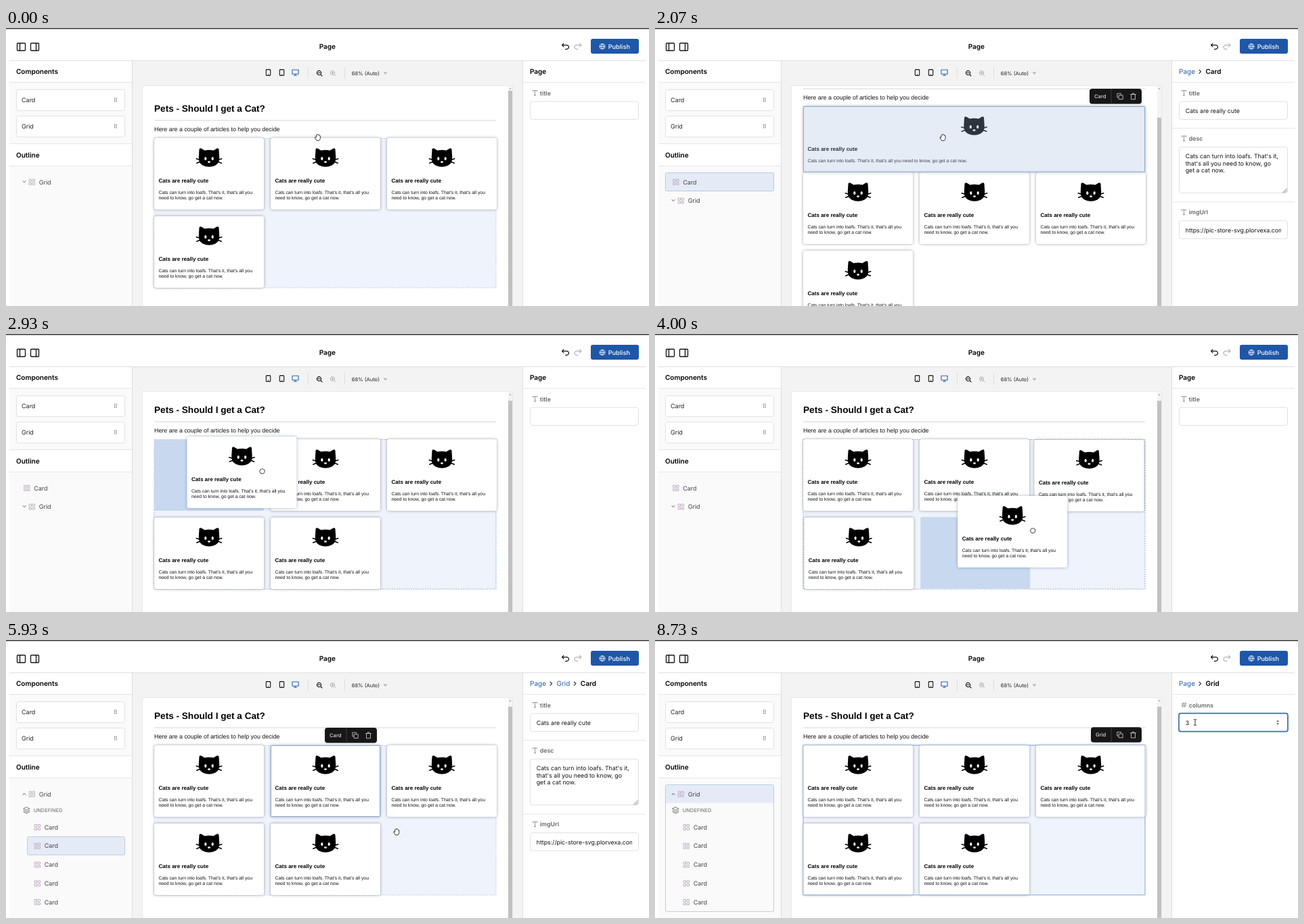
These frames come from a looping animation (950 by 412 pixels, 8.94 s). An HTML page with a canvas:

```html
<!DOCTYPE html>
<html lang="en">
<head>
<meta charset="utf-8">
<title>Page editor</title>
<style>
html, body { margin: 0; width: 100%; height: 100%; overflow: hidden; background: #fff; }
canvas { display: block; width: 950px; height: 412px; }
</style>
</head>
<body>
<canvas id="stage"></canvas>
<script>
const W = 950, H = 412, LOOP = 8940;
const canvas = document.getElementById('stage');
const ctx = canvas.getContext('2d');
const ratio = window.devicePixelRatio || 1;
canvas.width = W * ratio;
canvas.height = H * ratio;

const UI = 'Inter, sans-serif';
const ARIAL = '"Liberation Sans", Arial, sans-serif';
const LINE = '#dedede', BLUE = '#1f57a8', SOFT_BLUE = '#c8d8ee', ZONE = '#eff3fb';
const TITLE = 'Cats are really cute';
const DESC = ["Cats can turn into loafs. That's it, that's all you", 'need to know, go get a cat now.'];
const IMAGE = 'https:\/\/pic-store-svg.plorvexa.com';

// Moments of the story, in ms
const LEAVE = 380, GRAB_NEW = 750, ENTER_PAGE = 1150, DROP_NEW = 1700,
  GRAB_CARD = 2270, ENTER_GRID = 2450, DROP_CARD = 5300, PICK_GRID = 6600, FOCUS = 7070;

// Cursor path and page scroll as [time, ...values]
const CURSOR = [[0, 461, 162], [150, 440, 158], [650, 62, 108], [750, 62, 108], [930, 120, 118],
  [1250, 330, 165], [1600, 420, 168], [2070, 426, 162], [2270, 330, 167], [2600, 345, 190],
  [2930, 378, 203], [3200, 500, 205], [3500, 640, 215], [3750, 610, 270], [4000, 558, 291],
  [4300, 600, 285], [4600, 595, 225], [5000, 476, 228], [5250, 472, 214], [5600, 500, 240],
  [6200, 640, 320], [6650, 640, 325], [7030, 798, 122]];
const SCROLL = [[0, 0], [1300, 0], [1750, 47], [2300, 47], [2650, 7]];
// Slot of the dragged card inside the grid
const SLOTS = [[ENTER_GRID, 0], [3080, 1], [3400, 2], [3800, 4], [4450, 2], [5100, 1]];
const GRAB = { x: 111, y: 51 };
const ROOT = { x: 219, y: 163, w: 505, h: 97.5 };

const clamp = v => Math.max(0, Math.min(1, v));
const ease = p => 1 - (1 - clamp(p)) ** 3;
const lerp = (a, b, p) => a + (b - a) * p;
const mix = (a, b, p) => ({ x: lerp(a.x, b.x, p), y: lerp(a.y, b.y, p), w: lerp(a.w, b.w, p), h: lerp(a.h, b.h, p) });
const within = (t, from, to) => t >= from && t < to;

function along(track, t) {
  let i = track.length - 1;
  while (track[i][0] > t) i--;
  const a = track[i], b = track[i + 1];
  if (!b) return a.slice(1);
  const p = (t - a[0]) / (b[0] - a[0]);
  return a.slice(1).map((v, k) => lerp(v, b[k + 1], p));
}

function text(s, x, y, size, color = '#000', weight = 400, font = UI) {
  ctx.font = `${weight} ${size}px ${font}`;
  ctx.fillStyle = color;
  ctx.fillText(s, x, y + size * 0.36);
  return ctx.measureText(s).width;
}

function rect(x, y, w, h, fill) {
  ctx.fillStyle = fill;
  ctx.fillRect(x, y, w, h);
}

function box(x, y, w, h, r, fill, stroke, width = 1) {
  ctx.beginPath();
  ctx.roundRect(x, y, w, h, r);
  if (fill) { ctx.fillStyle = fill; ctx.fill(); }
  if (stroke) { ctx.strokeStyle = stroke; ctx.lineWidth = width; ctx.stroke(); }
}

function icon(path, x, y, stroke, width = 1, fill) {
  ctx.save();
  ctx.translate(x, y);
  ctx.lineCap = ctx.lineJoin = 'round';
  const shape = new Path2D(path);
  if (fill) { ctx.fillStyle = fill; ctx.fill(shape); }
  if (stroke) { ctx.strokeStyle = stroke; ctx.lineWidth = width; ctx.stroke(shape); }
  ctx.restore();
}

const ICON = {
  undo: 'M-2.5-4.5L-5-2L-2.5.5M-5-2H2A2.9 2.9 0 0 1 2 4H0',
  redo: 'M2.5-4.5L5-2L2.5.5M5-2H-2A2.9 2.9 0 0 0-2 4H0',
  globe: 'M-4 0A4 4 0 1 1 4 0A4 4 0 1 1-4 0H4M0-4Q-3.4 0 0 4Q3.4 0 0-4',
  phone: 'M-2.3-4.4H2.3Q3.2-4.4 3.2-3.5V3.5Q3.2 4.4 2.3 4.4H-2.3Q-3.2 4.4-3.2 3.5V-3.5Q-3.2-4.4-2.3-4.4ZM0 2.5V2.6',
  monitor: 'M-4.6-4H4.6V2.2H-4.6ZM0 2.2V4.3M-2 4.3H2',
  zoomOut: 'M2.6-.5A3.1 3.1 0 1 1-3.6-.5A3.1 3.1 0 1 1 2.6-.5M1.8 1.8L4 4M-2-.5H1',
  zoomIn: 'M2.6-.5A3.1 3.1 0 1 1-3.6-.5A3.1 3.1 0 1 1 2.6-.5M1.8 1.8L4 4M-2-.5H1M-.5-2V1',
  grid: 'M-4-4H-1V-1H-4ZM1-4H4V-1H1ZM-4 1H-1V4H-4ZM1 1H4V4H1Z',
  layers: 'M0-4.5L4.5-2.2L0 .1L-4.5-2.2ZM-4.5.2L0 2.5L4.5.2M-4.5 2.4L0 4.7L4.5 2.4',
  down: 'M-2-1L0 1L2-1',
  up: 'M-2 1L0-1L2 1',
  right: 'M-1.3-2.6L1.3 0L-1.3 2.6',
  copy: 'M-1.5-1.5H4.2V4.2H-1.5ZM-2.6 1.5H-4.2V-4.2H1.5V-2.6',
  trash: 'M-4-2.8H4M-3-2.8V4.4H3V-2.8M-1.4-2.8V-4.4H1.4V-2.8',
  letter: 'M-3.2-2.4V-3.6H3.2V-2.4M0-3.6V3.6M-1.2 3.6H1.2',
  hash: 'M-3.4-1.4H3.6M-3.6 1.4H3.4M-.9-3.6L-1.9 3.6M1.9-3.6L.9 3.6',
  hand: 'M-2 4.5L-4.4.9Q-4.8-.6-3.6-.4L-2.6.5V-3Q-1.9-4.2-1.2-3.2V-4Q-.4-5 .4-4V-3.6Q1.2-4.5 1.9-3.5V-2.6Q3-3.2 3.5-2.2V1.5Q3.3 3 2.2 4.5Z',
  fist: 'M-2 3.6L-3.6 1Q-4-.8-2.6-1V-2.2Q-1.9-3.2-1-2.6Q-.2-3.6.6-2.7Q1.5-3.3 2.1-2.3Q3.3-2.5 3.5-1.2V1.2Q3.3 2.6 2.3 3.6Z',
  arrow: 'M0 0V10L2.4 7.8L4 11.2L5.5 10.5L4 7.2H7Z',
  beam: 'M-1.6-4.5Q0-4.5 0-3.4Q0-4.5 1.6-4.5M0-3.4V3.4M-1.6 4.5Q0 4.5 0 3.4Q0 4.5 1.6 4.5',
  cat: 'M-14.5-12Q-14-15-11-13.2L-6.5-10.4Q0-12 6.5-10.4L11-13.2Q14-15 14.5-12L15.2-1Q16 8 9.5 11.5Q0 16 -9.5 11.5Q-16 8-15.2-1Z',
  whiskers: 'M-14 3.2L-18.7 1.8M-14 6.5L-18.2 8.2M14 3.2L18.7 1.8M14 6.5L18.2 8.2'
};

function cat(x, y) {
  icon(ICON.cat, x, y, null, 1, '#000');
  icon(ICON.whiskers, x, y, '#000', 1.6);
  ctx.fillStyle = '#fff';
  for (const [dx, dy, rx, ry] of [[-5.2, 1.6, 1.6, 2.5], [5.2, 1.6, 1.6, 2.5], [0, 6.6, 2, 1.3]]) {
    ctx.beginPath();
    ctx.ellipse(x + dx, y + dy, rx, ry, 0, 0, 7);
    ctx.fill();
  }
}

function card({ x, y, w, h }, { hover, selected, lifted } = {}) {
  ctx.save();
  ctx.shadowColor = lifted ? 'rgba(70,100,150,.5)' : 'rgba(0,0,0,.36)';
  ctx.shadowBlur = 4 * ratio;
  box(x, y, w, h, 3, '#fff');
  ctx.restore();
  cat(x + w / 2, y + 29);
  text(TITLE, x + 6.5, y + 63.5, 8.04, '#000', 700, ARIAL);
  const lines = w > 300 ? [DESC.join(' ')] : DESC;
  lines.forEach((s, i) => text(s, x + 6.5, y + 80.2 + i * 8, 6.82, '#111', 400, ARIAL));
  if (hover) box(x, y, w, h, selected ? 0 : 3, 'rgba(160,188,223,.28)');
  if (selected) box(x + .5, y + .5, w - 1, h - 1, 0, null, '#8aabd9');
}

function actionBar(label, right, top) {
  const w = label === 'Card' ? 77 : 75;
  const x = right - 5 - w, y = top - 26, mid = y + 11.3;
  box(x, y, w, 22.5, 4, '#171717');
  text(label, x + 7, mid, 7.6, '#dcdcdc', 500);
  rect(right - 50.5, y, 1, 22.5, '#3c3c3c');
  icon(ICON.copy, right - 37, mid, '#c4c4c4', .9);
  icon(ICON.trash, right - 17.5, mid, '#c4c4c4', .9);
}

const slotBox = (i, top) => ({ x: 219 + i % 3 * 172, y: top + Math.floor(i / 3) * 116, w: 162, h: 106 });

// Box for slotOf(dragged slot), easing over from the slot before the latest move
function movingSlot(t, top, slotOf) {
  let i = SLOTS.length - 1;
  while (i >= 0 && SLOTS[i][0] > t) i--;
  const at = k => slotBox(slotOf(k < 0 ? Infinity : SLOTS[k][1]), top);
  if (i < 0) return at(-1);
  const from = i === 0 && slotOf(Infinity) === Infinity ? at(0) : at(i - 1);
  return mix(from, at(i), ease((t - SLOTS[i][0]) / 250));
}

function draggedBox(t, cursor, scroll) {
  const p = ease((t - ENTER_GRID) / 150);
  return { x: cursor.x - GRAB.x, y: cursor.y + scroll - GRAB.y, w: lerp(505, 162, p), h: lerp(97.5, 106, p) };
}

function looseCard(t, top) {
  const drop = t < GRAB_CARD ? DROP_NEW : DROP_CARD;
  const time = Math.min(t, drop);
  const [x, y] = along(CURSOR, time);
  const held = draggedBox(time, { x, y }, along(SCROLL, time)[0]);
  const home = drop === DROP_NEW ? ROOT : slotBox(SLOTS[SLOTS.length - 1][1], top);
  return mix(held, home, ease((t - drop) / 200));
}

function page(t, cursor, dragging) {
  const scroll = along(SCROLL, t)[0];
  rect(201, 85, 548, 327, '#e9e9e9');
  rect(202, 86, 540, 326, '#fff');
  rect(742, 86, 6, 326, '#f4f4f4');
  icon('M-1.6.8L0-1L1.6.8Z', 745, 90, null, 1, '#999');
  rect(742, 93 + scroll * .85, 6, 412, '#c1c1c1');

  ctx.save();
  ctx.beginPath();
  ctx.rect(202, 86, 540, 326);
  ctx.clip();
  ctx.translate(0, -scroll);
  text('Pets - Should I get a Cat?', 219, 119.5, 13.6, '#000', 700, ARIAL);
  rect(219, 136.5, 505, 1, '#d6d6d6');
  text('Here are a couple of articles to help you decide', 219, 150, 8.9, '#111', 400, ARIAL);

  const top = 163 + 98 * (ease((t - ENTER_PAGE) / 250) - ease((t - ENTER_GRID) / 150));
  const inGrid = within(t, ENTER_GRID, DROP_CARD);
  const picked = t >= PICK_GRID;
  if (t < LEAVE || t >= ENTER_GRID) {
    rect(219, top, 505, 222, ZONE);
    ctx.setLineDash(picked ? [] : [2, 1.5]);
    box(219, top + .5, 505, 221.5, 0, null, inGrid ? '#8fb0dc' : '#bcd0ea');
    ctx.setLineDash([]);
  }
  if (within(t, ENTER_PAGE, DROP_NEW) || within(t, GRAB_CARD, ENTER_GRID))
    rect(ROOT.x, ROOT.y, ROOT.w, ROOT.h, SOFT_BLUE);
  if (inGrid) {
    const gap = movingSlot(t, top, d => d);
    box(gap.x, gap.y, gap.w, gap.h, 2, SOFT_BLUE);
  }

  const hovered = b => !dragging && cursor.x > b.x && cursor.x < b.x + b.w &&
    cursor.y + scroll > b.y - 1 && cursor.y + scroll < b.y + b.h;
  for (let k = 0; k < 4; k++) {
    const b = movingSlot(t, top, d => k < d ? k : k + 1);
    card(b, { hover: hovered(b) });
  }
  if (t >= ENTER_PAGE) {
    const b = looseCard(t, top);
    const selected = within(t, DROP_NEW, GRAB_CARD) || within(t, DROP_CARD, PICK_GRID);
    card(b, { hover: hovered(b), selected, lifted: dragging });
    if (selected) actionBar('Card', b.x + b.w, b.y);
  }
  if (picked) {
    box(219, top - .3, 505, 222, 0, null, '#9dbbe2');
    actionBar('Grid', 724, top - .7);
  }
  ctx.restore();
}

function header() {
  rect(0, 0, W, 1.5, '#3a3a3c');
  rect(5, 48, 940, 1, LINE);
  for (const [x, bar] of [[22.5, -2], [42.5, 2]])
    icon(`M-5-5.5H5Q6-5.5 6-4.5V4.5Q6 5.5 5 5.5H-5Q-6 5.5-6 4.5V-4.5Q-6-5.5-5-5.5ZM${bar}-5.5V5.5`, x, 28, '#111', 1.3);
  text('Page', 462.7, 27.3, 10, '#000', 600);
  icon(ICON.undo, 826.5, 27.3, '#111', 1.2);
  icon(ICON.redo, 845, 27.3, '#b5b5b5', 1.2);
  box(864, 16, 71, 22, 3, BLUE);
  icon(ICON.globe, 881, 27.3, '#fff', .8);
  text('Publish', 889.7, 27.3, 9.2, '#fff', 500);
}

function viewBar() {
  rect(187, 49, 576, 363, '#f3f3f3');
  icon(ICON.phone, 387.5, 66, '#111', 1.1);
  icon(ICON.phone, 407.5, 66, '#111', 1.1);
  icon(ICON.monitor, 427.5, 66, '#2a66b8', 1.1);
  rect(446, 58, 1, 17, LINE);
  icon(ICON.zoomOut, 463, 67, '#111', 1.1);
  icon(ICON.zoomIn, 483, 67, '#b0b0b0', 1);
  rect(500, 58, 1, 17, LINE);
  text('68% (Auto)', 510.7, 66.8, 7.6, '#222');
  icon('M-3-1.5H3L0 2Z', 560.5, 67, null, 1, '#b5b5b5');
}

function outlineRow(label, iconX, y) {
  icon(ICON.grid, iconX, y, '#bda9c2', .9);
  text(label, iconX + 10.2, y, 9, '#444');
}

function sidebar(t) {
  rect(5, 49, 181, 363, '#fafafa');
  rect(5, 49, 181, 31, '#fff');
  rect(5, 172, 181, 32, '#fff');
  for (const y of [80, 171, 204]) rect(5, y, 181, 1, '#e6e6e6');
  rect(186, 49, 1, 363, LINE);
  text('Components', 15, 64.5, 10, '#000', 600);
  text('Outline', 15, 188, 10, '#000', 600);
  [['Card', 91], ['Grid', 130]].forEach(([label, y]) => {
    box(15.5, y + .5, 160, 31, 3, '#fff', '#e2e2e2');
    text(label, 23, y + 16, 9, '#222');
    for (let i = 0; i < 6; i++) rect(160 + i % 2 * 2.5, y + 12.5 + (i >> 1) * 2.3, 1.2, 1.2, '#555');
  });

  if (t >= DROP_CARD) {
    const picked = t >= PICK_GRID;
    if (picked) {
      box(15.5, 214.5, 160, 188, 2, null, '#bccde6');
      rect(16, 215, 159, 26.5, '#e5ebf6');
    } else box(31.5, 291.5, 144, 27, 2, '#e5ebf6', '#bccde6');
    icon(ICON.up, 27, 228.3, '#555');
    outlineRow('Grid', 38.5, 228.3);
    icon(ICON.layers, 30.5, 252.3, '#666', .9);
    text('UNDEFINED', 40.8, 252.7, 7.4, '#666');
    for (let i = 0; i < 5; i++) outlineRow('Card', 46.5, 277.5 + i * 27.75);
  } else if (t >= DROP_NEW) {
    if (t < GRAB_CARD) box(15.5, 214.5, 160, 27, 2, '#e5ebf6', '#b6c8e4');
    outlineRow('Card', 31, 228.3);
    icon(ICON.down, 27, 255.5, '#555');
    outlineRow('Grid', 38.5, 256);
  } else {
    icon(ICON.down, 27, 227.8, '#555');
    outlineRow('Grid', 38.5, 228.3);
  }
}

function field(label, y, lines, height = 27, glyph = ICON.letter) {
  icon(glyph, 781.5, y, '#8a8a8a', .9);
  text(label, 788.8, y + .3, 8.8, '#666', 600);
  box(774.5, y + 12.7, 160, height - .5, 3, '#fff', '#e0e0e0');
  ctx.save();
  ctx.beginPath();
  ctx.rect(776, y + 13, 149, height);
  ctx.clip();
  lines.forEach((s, i) => text(s, 783.7, y + 26.4 + i * 10.6, 8.8, '#111'));
  ctx.restore();
}

function breadcrumb(names) {
  let x = 774;
  names.forEach((name, i) => {
    const last = i === names.length - 1;
    const w = text(name, x, 64.5, 10, last ? '#000' : '#2a5fa5', last ? 600 : 400);
    if (!last) icon(ICON.right, x + w + 7.3, 64.7, '#222', 1.1);
    x += w + 15.5;
  });
}

function inspector(t) {
  rect(764, 49, 186, 363, '#fff');
  rect(763, 49, 1, 363, LINE);
  rect(764, 80, 181, 1, '#e6e6e6');
  const nested = within(t, DROP_CARD, PICK_GRID);
  if (nested || within(t, DROP_NEW, GRAB_CARD)) {
    breadcrumb(nested ? ['Page', 'Grid', 'Card'] : ['Page', 'Card']);
    field('title', 96.2, [TITLE]);
    field('desc', 163.7, ["Cats can turn into loafs. That's it,", "that's all you need to know, go", 'get a cat now.'], 68.5);
    icon('M-3 3L3-3M0 3L3 0', 930.5, 241, '#555', .8);
    field('imgUrl', 273, [IMAGE]);
    for (const y of [148, 257.5]) rect(764, y, 181, 1, '#e6e6e6');
  } else if (t >= PICK_GRID) {
    breadcrumb(['Page', 'Grid']);
    field('columns', 96.2, ['3'], 27, ICON.hash);
    icon('M-2-1.2L0-3.2L2-1.2ZM-2 1.2L0 3.2L2 1.2Z', 920, 122.2, null, 1, '#444');
    if (t >= FOCUS) {
      box(774, 108.7, 161, 27, 3, null, '#3f6fb4', 1.7);
      if (Math.floor((t - PICK_GRID) / 535) % 2 === 0) rect(788.7, 117, 1, 10.5, '#000');
    }
  } else {
    breadcrumb(['Page']);
    field('title', 96.2, []);
  }
}

function pointer(t, { x, y }, dragging) {
  if (within(t, GRAB_NEW, ENTER_PAGE)) {
    box(x - 46.5, y - 16.5, 160, 31, 3, '#fff', '#cfdcf0');
    text('Card', x - 39, y - 1, 9, '#222');
  }
  if (dragging) icon(ICON.fist, x, y, '#222', .9, '#fff');
  else if (x > 774 && y < 137) icon(ICON.beam, x, y, '#222', .9);
  else if (x > 763 || (x < 202 && x > 176)) icon(ICON.arrow, x, y, '#fff', .8, '#000');
  else icon(ICON.hand, x, y, '#222', .9, '#fff');
}

function draw(t) {
  ctx.setTransform(ratio, 0, 0, ratio, 0, 0);
  ctx.textRendering = 'geometricPrecision';
  rect(0, 0, W, H, '#fff');
  const [x, y] = along(CURSOR, t);
  const cursor = { x, y };
  const dragging = within(t, GRAB_NEW, DROP_NEW) || within(t, GRAB_CARD, DROP_CARD);
  header();
  viewBar();
  page(t, cursor, dragging);
  sidebar(t);
  inspector(t);
  pointer(t, cursor, dragging);
}

const start = performance.now();
function tick() {
  draw((performance.now() - start) % LOOP);
  requestAnimationFrame(tick);
}
tick();
</script>
</body>
</html>
```
